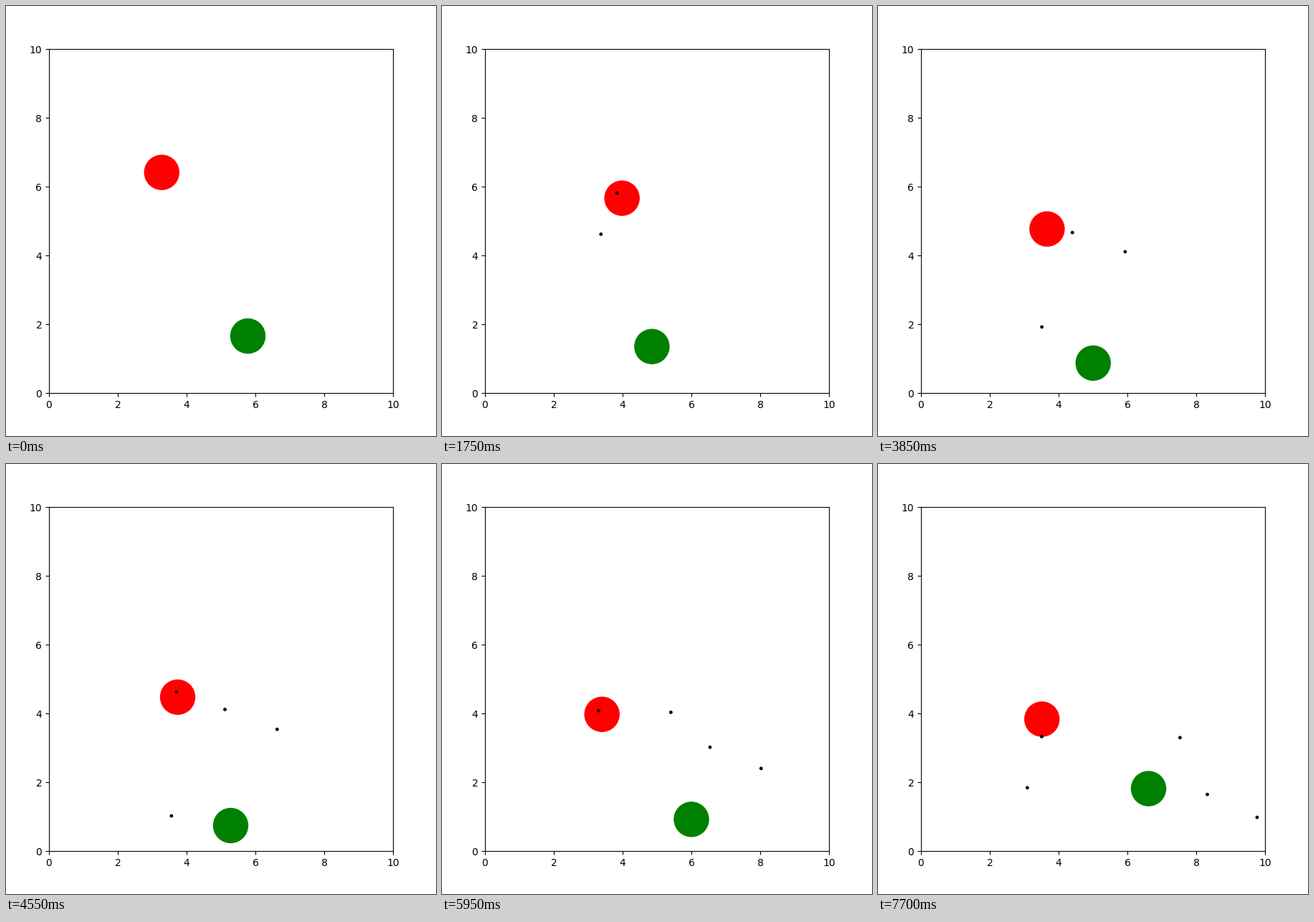
Recreate the animation shown at these times as a matplotlib script. Size 600 by 600 pixels, loop 8000 ms.

```python
import numpy as np
import matplotlib.pyplot as plt
from matplotlib.animation import FuncAnimation

TICK = 50            # ms
HOLD = 7             # ticks per simulation step
FRAMES = 160
SHOT_EVERY = 4       # steps
SHOT_SPEED = 0.45    # axes units per step
SHOT_ANGLES = np.radians([-87, -39.2, -37.6, -19.1, -95.4, -77.5])

# Turning points as (step, x, y); each leg between them is straight and even.
RED_TURNS = [(0, 3.277, 6.413), (5, 3.983, 5.663), (9, 3.59, 5.063),
             (13, 3.74, 4.473), (16, 3.302, 4.08), (17, 3.4, 3.973),
             (19, 3.448, 3.807), (21, 3.379, 3.72), (22, 3.515, 3.833)]
GREEN_TURNS = [(0, 5.781, 1.656), (2, 5.4, 1.6), (5, 4.852, 1.35),
               (9, 4.729, 1.0), (13, 5.281, 0.74), (15, 5.708, 0.84),
               (17, 6.0, 0.92), (19, 6.271, 1.215), (22, 6.615, 1.813)]


def along(turns, step):
    steps, xs, ys = zip(*turns)
    return np.array([np.interp(step, steps, xs), np.interp(step, steps, ys)])


def shot_position(i, step):
    """Each shot leaves the red disc and flies straight."""
    fired = i * SHOT_EVERY
    angle = SHOT_ANGLES[i]
    heading = np.array([np.cos(angle), np.sin(angle)])
    return along(RED_TURNS, fired) + SHOT_SPEED * (step - fired - 1) * heading


fig = plt.figure(figsize=(6, 6), dpi=100)
ax = fig.add_axes([0.1, 0.1, 0.8, 0.8], xlim=(0, 10), ylim=(0, 10))
red = ax.add_patch(plt.Circle((0, 0), 0.5, color="r"))
green = ax.add_patch(plt.Circle((0, 0), 0.5, color="g"))
shots = [ax.add_patch(plt.Circle((0, 0), 0.05, color="k", lw=0, zorder=2))
         for _ in SHOT_ANGLES]


def update(frame):
    step = frame // HOLD
    red.center = along(RED_TURNS, step)
    green.center = along(GREEN_TURNS, step)
    for i, shot in enumerate(shots):
        shot.center = shot_position(i, step)
        shot.set_visible(step > i * SHOT_EVERY)
    return red, green, *shots


anim = FuncAnimation(fig, update, frames=FRAMES, interval=TICK,
                     repeat=True, repeat_delay=0)
plt.show()
```
